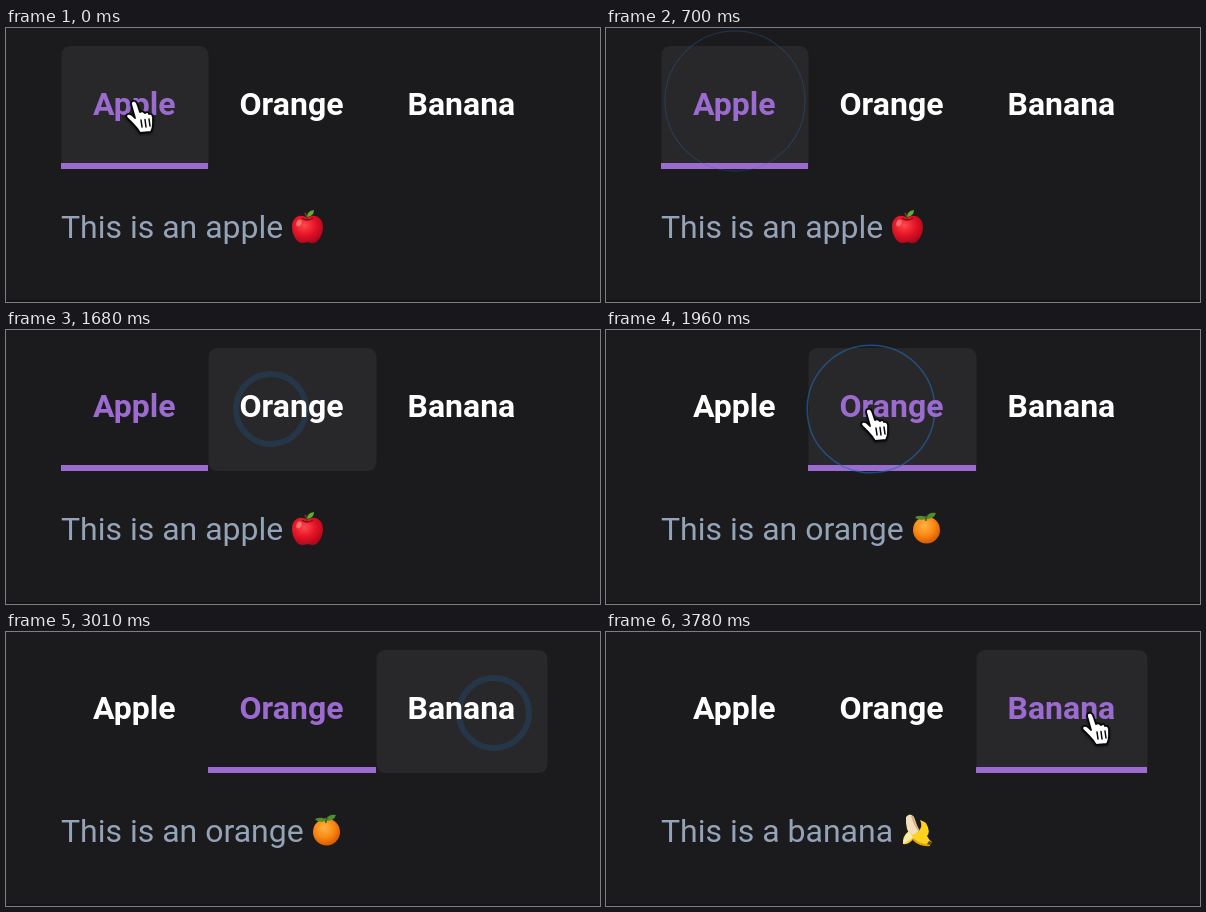
Recreate the animation shown at these times as an HTML page. Size 594 by 274 pixels, loop 3.85 s.

```html
<!DOCTYPE html>
<html lang="en">
<meta charset="utf-8">
<title>Fruit tabs</title>
<style>
  html, body { margin: 0; width: 100%; height: 100%; overflow: hidden; background: #1b1b1d; }
  svg { display: block; }
  text { font: 32px Roboto, sans-serif; fill: #94a3b8; }
  .label { font-weight: 700; fill: #fff; }
  .label.on { fill: #9c6bd0; }
  .hidden { display: none; }
</style>
<svg width="594" height="274" viewBox="0 0 594 274">
  <defs>
    <radialGradient id="red" cx=".4" cy=".35" r=".7">
      <stop offset="0" stop-color="#ff4a4d"/><stop offset=".5" stop-color="#e51527"/><stop offset="1" stop-color="#a90618"/>
    </radialGradient>
    <radialGradient id="amber" cx=".42" cy=".35" r=".65">
      <stop offset="0" stop-color="#ffb347"/><stop offset=".55" stop-color="#fb8a13"/><stop offset="1" stop-color="#d95a05"/>
    </radialGradient>
  </defs>
  <rect y="272" width="594" height="2" fill="#151315"/>
  <path id="hover" fill="#28282a"/>
  <rect id="bar" y="135" height="6" fill="#9c6bd0"/>
  <circle id="ring" fill="none" stroke="#2369b8"/>
  <text class="label" x="87" y="87">Apple</text>
  <text class="label" x="233.5" y="87">Orange</text>
  <text class="label" x="401.5" y="87">Banana</text>

  <g class="panel">
    <text x="55" y="210">This is an apple</text>
    <path d="M301 190C294 185 286 189 286 199C286 207 291 215 296 215Q299 215 301.500 214Q304 215 307 215C312 215 317 207 317 199C317 189 308 185 301 190Z" fill="url(#red)"/>
    <path d="M296 190Q301 194 307 190" fill="none" stroke="#8e0716" stroke-width="1.500"/>
    <path d="M301 191Q301 188 299 185" fill="none" stroke="#6b3a1c" stroke-width="2"/>
    <path d="M301 189Q301 183 308 182Q308 188 301 189Z" fill="#5fae2c"/>
    <ellipse cx="293" cy="195" rx="2.500" ry="3.500" fill="#ff9a98" opacity=".6" transform="rotate(25 293 195)"/>
  </g>
  <g class="panel">
    <text x="55" y="210">This is an orange</text>
    <circle cx="320.500" cy="200" r="13.500" fill="url(#amber)"/>
    <path d="M320 189Q312 191 309 187Q316 184 320 188Q322 182 330 183Q328 189 320 189Z" fill="#4f8f2f"/>
    <path d="M320 191Q319 188 322 185" fill="none" stroke="#35651f" stroke-width="1.500"/>
  </g>
  <g class="panel">
    <text x="55" y="210">This is a banana</text>
    <path d="M300 185Q304 180 308 185L313 199L306 206Q299 198 300 185Z" fill="#f4dfbd"/>
    <path d="M306 184Q308 192 313 199" fill="none" stroke="#d2b184" stroke-width="2"/>
    <path d="M303 199Q296 204 297 212Q303 213 307 207Q314 215 324 213L326 210Q323 208 321 204Q325 200 320 191Q317 189 314 188Q317 194 313 199L307 203Z" fill="#ffd21f"/>
    <path d="M303 199Q297 205 297 212Q301 210 307 205Z" fill="#f7eab9"/>
    <path d="M307 207Q314 214 324 213" fill="none" stroke="#e2a00a" stroke-width="2"/>
    <path d="M323 209L326 210L324 213L321 212Z" fill="#54421c"/>
  </g>

  <g id="hand" stroke-linejoin="round" stroke-linecap="round" style="filter:drop-shadow(0 1px 1px #0008)">
    <path d="M-4 2Q-4-2 0-1Q2 0 3 4L5 10Q7 8 10 11Q13 9 14 12Q17 11 18 15V22Q18 26 16 30L5 31Q2 26-2 22L-8 16Q-10 13-7 12Q-4 11 0 16Z" fill="#fff" stroke="#080808" stroke-width="1.800"/>
    <path d="M6 18l1 7M10 17.500l1 7.500M14 17l1 7" fill="none" stroke="#080808" stroke-width="1.500"/>
  </g>
</svg>
<script>
const STEP = 70, STEPS = 55;
const tabs = [[55, 147], [202, 168], [370, 171]];
const spots = [[129, 74], [264, 80], [485, 82]];
const moves = [[10, 16], [38, 42]];
const clicks = [[5, 129, 73], [24, 265, 79], [43, 488, 81]];
const alphas = [.22, .4, .55, .62, .62, .36];
const $ = id => document.getElementById(id);
const labels = document.querySelectorAll('.label');
const panels = document.querySelectorAll('.panel');

function set(el, attrs) {
  for (const key in attrs) el.setAttribute(key, attrs[key]);
}

function pointer(n) {
  let [x, y] = spots[0];
  moves.forEach(([from, to], i) => {
    const p = Math.min(1, Math.max(0, (n - from) / (to - from)));
    const e = p * p * (3 - 2 * p);
    x += (spots[i + 1][0] - spots[i][0]) * e;
    y += (spots[i + 1][1] - spots[i][1]) * e;
  });
  return [x, y];
}

function draw(n) {
  const [x, y] = pointer(n);
  const active = n >= 45 ? 2 : n >= 26 ? 1 : 0;
  const over = x >= 370 ? 2 : x >= 202 ? 1 : 0;

  const [left, width] = tabs[over];
  const r = over === active ? 0 : 10;
  set($('hover'), { d: `M${left + 10.5} 18h${width - 20}q10 0 10 10v${113 - r}q0 ${r} ${-r} ${r}h${2 * r - width}q${-r} 0 ${-r} ${-r}V28q0-10 10-10Z` });
  set($('bar'), { x: tabs[active][0], width: tabs[active][1] });
  labels.forEach((el, i) => el.classList.toggle('on', i === active));
  panels.forEach((el, i) => el.classList.toggle('hidden', i !== active));

  const click = clicks.find(([at]) => n >= at && n < at + 6);
  $('ring').classList.toggle('hidden', !click);
  if (click) {
    const [at, cx, cy] = click, k = n - at;
    set($('ring'), { cx, cy, r: 35 + 8 * k - .2 * k * k, 'stroke-width': 6 * .7 ** k, opacity: alphas[k] });
  }

  // A press hides the pointer until the page changes or the mouse moves.
  const pressed = n >= 5 && n <= 10 || n >= 24 && n < 26 || n >= 43 && n < 45;
  $('hand').classList.toggle('hidden', pressed);
  set($('hand'), { transform: `translate(${x} ${y})` });
}

const start = performance.now();
function tick(now) {
  draw(Math.floor(Math.max(0, now - start) / STEP) % STEPS);
  requestAnimationFrame(tick);
}
draw(0);
requestAnimationFrame(tick);
</script>
</html>
```
